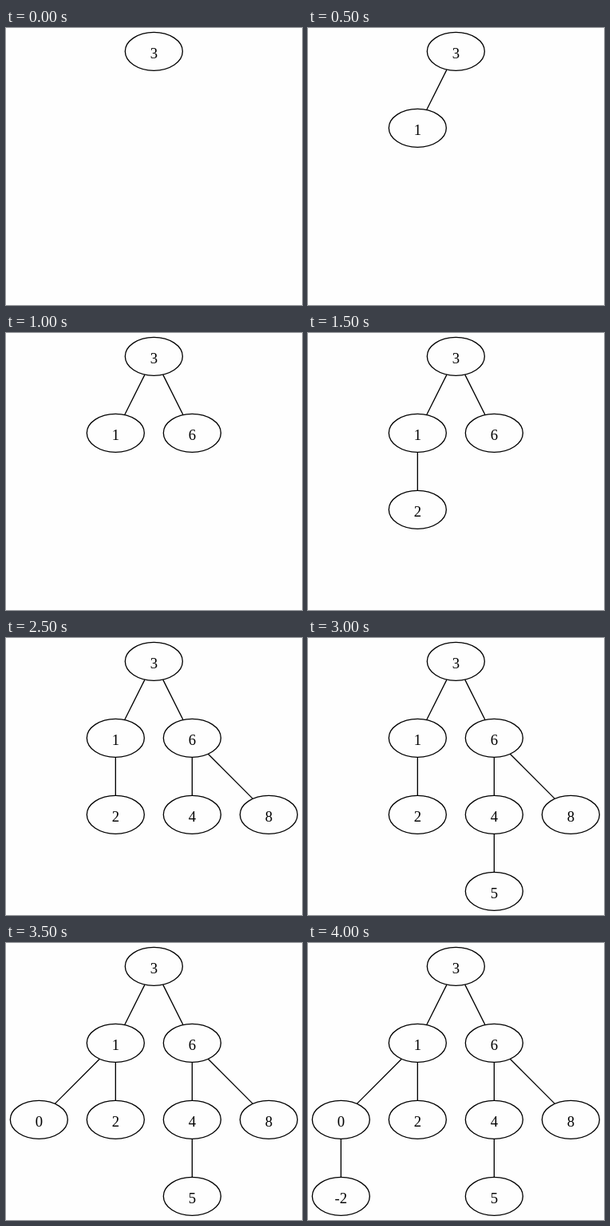
An HTML page that plays this animation: 371x347 px, repeating every 4.5 s.

```html
<!DOCTYPE html>
<html lang="en">
<head>
<meta charset="utf-8">
<title>Binary search tree insertion</title>
<style>
  html, body { margin: 0; width: 100%; height: 100%; overflow: hidden; background: #fefefe; }
  svg { display: block; }
  ellipse, line { fill: none; stroke: #000; stroke-width: 1.333; }
  text { font: 18.667px "Liberation Serif", "Times New Roman", serif; text-anchor: middle; }
</style>
</head>
<body>
<svg id="stage" width="371" height="347" viewBox="0 0 371 347"></svg>
<script>
const STEP = 500;
const GAP = 96, RX = 36, RY = 24, LEFT = 41.333, TOP = 29.333;

// Insertion order: key, column, level, parent key
const inserts = [
  [3, 1.5, 0],
  [1, 1, 1, 3],
  [6, 2, 1, 3],
  [2, 1, 2, 1],
  [8, 3, 2, 6],
  [4, 2, 2, 6],
  [5, 2, 3, 4],
  [0, 0, 2, 1],
  [-2, 0, 3, 0],
];
const duration = inserts.length * STEP;
const stage = document.getElementById("stage");
const centers = new Map();

function add(parent, tag, attrs = {}) {
  const el = document.createElementNS("http://www.w3.org/2000/svg", tag);
  for (const [name, value] of Object.entries(attrs)) el.setAttribute(name, value);
  return parent.appendChild(el);
}

// Straight edge clipped to the outlines of both ellipses
function addEdge(group, a, b) {
  const dx = b.x - a.x, dy = b.y - a.y;
  const t = 1 / Math.hypot(dx / RX, dy / RY);
  add(group, "line", {
    x1: a.x + dx * t, y1: a.y + dy * t,
    x2: b.x - dx * t, y2: b.y - dy * t,
  });
}

function showFrom(el, time) {
  const offset = time / duration;
  el.animate([
    { opacity: 0, offset: 0 },
    { opacity: 0, offset },
    { opacity: 1, offset },
    { opacity: 1, offset: 1 },
  ], { duration, iterations: Infinity });
}

inserts.forEach(([key, column, level, parentKey], i) => {
  const c = { x: LEFT + column * GAP, y: TOP + level * GAP };
  centers.set(key, c);
  const group = add(stage, "g");
  if (parentKey !== undefined) addEdge(group, centers.get(parentKey), c);
  add(group, "ellipse", { cx: c.x, cy: c.y, rx: RX, ry: RY });
  add(group, "text", { x: c.x, y: c.y + 8.667 }).textContent = key;
  if (i > 0) showFrom(group, i * STEP);
});
</script>
</body>
</html>
```
